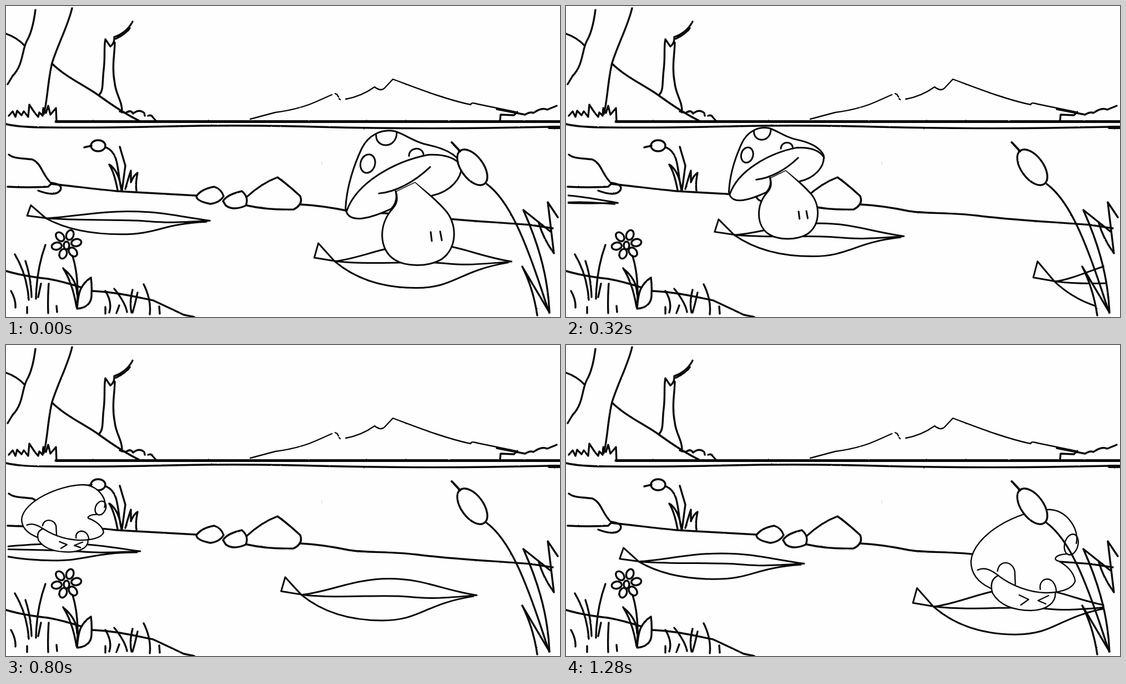
These frames come from a looping animation (998 px wide and 561 px high, 1.36 s). An HTML page:

```html
<!DOCTYPE html>
<html lang="en">
<head>
<meta charset="utf-8">
<title>Mushroom on the pond</title>
<style>
  html, body { margin: 0; width: 100%; height: 100%; overflow: hidden; background: #fefefe; }
  svg { display: block; width: 998px; height: 561px; }
  path, ellipse { vector-effect: non-scaling-stroke; }
  .solid { fill: #fefefe; }
  .bare { fill: #fefefe; stroke: none; }
  .pencil { filter: url(#pencil); stroke-width: 3.4; }
  .thin { stroke-width: 2.4; }
</style>
</head>
<body>
<svg viewBox="0 0 998 561" fill="none" stroke="#080808" stroke-width="3" stroke-linecap="round" stroke-linejoin="round">
  <defs>
    <filter id="pencil" filterUnits="userSpaceOnUse" x="0" y="0" width="998" height="561" color-interpolation-filters="sRGB">
      <feTurbulence type="fractalNoise" baseFrequency=".25" numOctaves="2" seed="4"/>
      <feDisplacementMap in="SourceGraphic" scale="1.6" xChannelSelector="R" yChannelSelector="G"/>
    </filter>
    <clipPath id="water"><path d="M3 0H950L968 457L980 561H3Z"/></clipPath>
  </defs>

  <g class="pencil">
    <!-- trees and far bank -->
    <path d="M53 7C50 30 45 50 38 62C28 80 32 105 12 126L3 141M0 50Q20 57 33 71M119 4C112 35 93 70 83 103C75 135 75 170 68 195"/>
    <path d="M83 104C110 130 140 142 168 162C190 178 215 195 240 207"/>
    <path d="M168 160C176 152 173 140 176 115C179 90 176 75 179 60L188 73Q196 67 195 56Q218 48 228 28M198 59Q216 50 223 40M196 66C196 85 190 110 196 140C198 160 210 172 209 192"/>
    <path d="M205 190L216 193Q224 186 229 194Q240 185 249 193L250 198M256 198Q262 196 264 200L270 207"/>
    <path d="M5 198L12 190L17 200L20 189L28 197L32 190L40 200L42 178L52 193L58 200L60 192L66 198L67 184L72 193L76 180L80 196L90 184L91 208"/>
    <path d="M90 208.5H998" stroke-width="5"/>
    <path d="M0 213Q25 219 75 219Q180 220 300 217Q420 214 560 218Q720 222 870 220L980 218"/>
    <path d="M979 219H998" stroke-width="6"/>
    <path class="thin" d="M440 204L485 192Q530 186 560 172L587 160M593 158l4 2M597 161l2 3M600 167l2 2M612 168Q640 163 664 146Q675 155 682 148L697 132C740 148 790 168 837 178Q838 173 850 177L918 191"/>
    <path d="M890 207L891 196L915 197L921 191M884 186L935 196Q945 190 950 193Q965 182 975 187L992 180"/>
    <!-- rocks and near bank -->
    <path d="M5 268C15 276 30 274 48 277C65 285 65 305 82 320L76 326Q40 328 3 326M82 319Q103 322 98 332Q90 345 58 333"/>
    <path d="M82 321C120 325 160 330 200 334L343 342M531 358Q570 360 618 370C650 375 690 372 740 378C800 386 870 389 945 395L985 401"/>
    <path d="M343 343Q352 330 375 326Q388 330 392 343Q385 355 368 357Q343 352 343 343ZM391 352Q398 340 425 334Q438 345 432 360Q410 370 396 360ZM433 345Q460 320 489 309Q505 320 530 343Q536 358 518 367Q470 368 435 360"/>
    <path d="M141 255L154 252M180 255C205 265 200 300 208 332M205 254L215 288Q212 310 209 332M186 286Q195 300 201 332M188 287Q204 300 208 332M215 330Q222 305 225 297L225 318Q230 305 237 301Q233 320 235 333"/>
    <ellipse cx="166" cy="252" rx="13" ry="10"/>
    <path d="M569 281v5" stroke="#ccc" stroke-width="1"/>
  </g>

  <path id="leaves" clip-path="url(#water)"/>

  <g id="sit">
    <path class="solid" d="M702 334C706 345 706 355 697 365C670 395 672 440 700 458C720 471 760 472 785 457C815 435 812 390 790 367C775 350 760 338 737 317Z"/>
    <path class="bare" d="M694 366C664 380 616 398 612 365C614 325 628 285 640 259C652 232 676 221 700 225C722 232 735 245 760 250C785 255 812 266 820 285C823 310 800 335 767 342L737 317L702 334Q707 352 694 366Z"/>
    <path d="M694 366C664 380 616 398 612 365C614 325 628 285 640 259C652 232 676 221 700 225C722 232 735 245 760 250C785 255 812 266 820 285C823 310 800 335 767 342M614 370C632 318 700 280 760 268C790 266 812 274 821 290M672 338C702 335 735 318 764 290M702 334Q707 352 694 366"/>
    <path d="M667 232C666 257 704 258 704 227M726 270C726 254 750 252 752 267M765 408L767 424M782 407L785 423"/>
    <ellipse cx="652" cy="284" rx="13" ry="17" transform="rotate(15 652 284)"/>
  </g>

  <g id="squash">
    <path class="bare" d="M262 347C230 357 215 356 217 346C228 312 255 260 285 238C303 230 312 240 315 257C350 268 375 285 371 306C365 320 355 329 342 335L350 352L354 372C354 395 335 408 300 408C270 408 250 395 250 375Q251 358 262 347Z"/>
    <path d="M262 347C230 357 215 356 217 346C228 312 255 260 285 238C303 230 312 240 315 257C350 268 375 285 371 306C365 320 355 329 342 335M217 346C240 318 290 308 330 308Q352 307 369 311M250 342C280 338 315 335 333 315"/>
    <path d="M265 340Q270 345 262 350C252 358 250 366 250 375C250 395 270 408 300 408C335 408 354 395 354 372C353 350 345 345 330 328"/>
    <path d="M284 246C286 268 311 264 311 248M323 306C323 294 342 294 344 306M314 374L323 383M330 379L332 382L339 373"/>
    <ellipse cx="266" cy="295" rx="11" ry="9"/>
  </g>

  <g id="splat" class="thin">
    <path class="bare" d="M762 441C742 432 726 418 726 392C730 345 810 300 868 299C900 301 922 335 916 360Q908 377 890 380C878 383 874 389 884 392C898 399 912 412 914 428C908 445 880 449 860 449L800 455Z"/>
    <path class="bare" d="M775 418C760 425 762 440 765 450C780 475 810 481 835 481C865 480 880 465 878 448L820 430Z"/>
    <path d="M762 441C742 432 726 418 726 392C730 345 810 300 868 299C900 301 922 335 916 360M900 379L890 380C878 383 874 389 884 392C898 399 912 412 914 428C908 445 880 449 860 449C830 448 800 436 778 420C762 407 750 402 738 408"/>
    <path d="M775 418C760 425 762 440 765 450C780 475 810 481 835 481C865 480 880 465 878 448"/>
    <path d="M774 410C776 390 800 390 805 410L806 434M851 443C847 420 878 415 880 447M813 453L830 461L816 471M866 454L847 463L861 469"/>
    <ellipse cx="907" cy="362" rx="12" ry="19" transform="rotate(15 907 362)"/>
  </g>

  <g id="jump" class="thin">
    <path class="solid" d="M498 92C470 110 440 117 425 103C395 75 398 30 415 0C435 -45 475 -75 520 -65C560 -55 600 -35 605 5Q608 35 590 54L540 10Z"/>
    <path class="bare" d="M490 40C505 50 508 70 498 92C490 110 495 130 515 145C535 160 570 160 590 144C610 125 610 100 605 85C600 65 580 45 540 10Z"/>
    <path d="M490 40C505 50 508 70 498 92C490 110 495 130 515 145C535 160 570 160 590 144C610 125 610 100 605 85C600 65 580 45 540 10M425 103C424 70 430 30 462 0C500 -35 580 -40 603 0M484 50C500 25 530 2 560 12"/>
    <path d="M446 9C430 4 414 15 417 30Q421 46 432 47M567 103v12M586 101v15"/>
  </g>

  <g class="pencil">
    <!-- cattail and reeds -->
    <ellipse class="solid" cx="840" cy="291" rx="20" ry="37" transform="rotate(-36 840 291)"/>
    <path d="M803 246L818 262" stroke-width="4"/>
    <path d="M866 321C905 350 935 415 978 553M932 368C955 420 976 480 979 553M932 368L981 407M994 381L976 354L987 446Q968 420 960 392"/>
    <path class="solid" d="M957 558Q950 510 930 470L979 553"/>
    <!-- near bank, flower and grass -->
    <path d="M0 478Q30 487 75 492C110 498 130 506 155 514C200 516 230 524 265 531Q295 545 320 557L339 561"/>
    <g id="flower" class="solid"></g>
    <path d="M120 451Q132 490 128 544M103 473Q120 500 127 543M106 476Q128 495 128 520"/>
    <path class="solid" d="M153 490C130 505 130 525 128 546C145 545 155 535 154 520Q155 505 153 490"/>
    <path d="M71 431Q55 475 54 528M16 448Q38 485 41 530M35 460Q45 490 46 525M63 501L58 525M77 501Q75 525 76 554M9 514Q18 530 17 544M38 543v11M91 541l1 11M179 514Q192 535 186 553M179 543v12M195 510Q215 535 218 552M204 540l-5 14M228 512Q222 535 226 553M237 517Q232 540 228 553M248 502Q262 530 259 556M276 542l1 13"/>
  </g>
</svg>

<script>
const STEP = 80, LOOP = 1360, POSES = 16;
const LAUNCH = 10, LANDING = 14;
const $ = id => document.getElementById(id);

const petal = i => `<ellipse cx="18" rx="9" ry="6.5" transform="translate(109 430) rotate(${i * 60 - 70})"/>`;
$('flower').innerHTML = [0, 1, 2, 3, 4, 5].map(petal).join('') + '<ellipse cx="109" cy="432" rx="5" ry="7"/>';

// Value at v on the broken line through the points, extended past both ends
function along(points, v) {
  let i = 1;
  while (i < points.length - 1 && points[i][0] < v) i++;
  const [x0, y0] = points[i - 1], [x1, y1] = points[i];
  return y0 + (y1 - y0) * (v - x0) / (x1 - x0);
}

// Where each leaf has drifted to by a given pose, the height of the
// stream at that place, and how far along its leaf the mushroom sits
const drift = [
  [[13, 802], [16, 592], [20, 303], [22, 187], [25, -48]],
  [[4, 880], [6, 710], [9, 532], [13, 249], [16, 72], [20, -190]]
];
const stream = [[-190, 347], [72, 383], [303, 413], [662, 472], [880, 497]];
const seat = [[-48, 150], [187, 113], [303, 98], [437, 128], [592, 151]];

// Leaves look longer and more open the nearer they are
function leafPath(x) {
  const y = along(stream, x);
  const length = 292 + .045 * x;
  const rise = Math.max(7, 10 + .036 * x);
  const drop = 56 * Math.sqrt(Math.max(0, x + 220) / 1100);
  const stem = 10 + .47 * drop;
  const tip = (50 - drop) * .2;
  const p = (u, v) => `${x + u * length} ${y + v} `;
  return `M${p(0, 0)}L${p(-.092, -stem)}L${p(-.115, -.2 * stem)}L${p(.01, 0)}` +
    `C${p(.2, .14 * drop)}${p(.4, tip / 2)}${p(.55, tip / 2 + 2)}S${p(.68, tip + .2 * drop)}${p(1, tip)}` +
    `M${p(0, 0)}C${p(.15, -.15 * rise)}${p(.3, -rise)}${p(.5, -rise)}S${p(.8, -.3 * rise)}${p(1, tip)}` +
    `M${p(0, 0)}C${p(.1, .56 * drop)}${p(.24, drop)}${p(.46, drop)}S${p(.7, .36 * drop)}${p(.98, tip + 2)}`;
}

// Bottom centre of each drawing, and its scale when the leaf is at x
const drawings = {
  sit: { origin: [743, 468], scale: x => [.63 + .00063 * x, .64 + .0006 * x] },
  squash: { origin: [300, 408], scale: () => [1, 1] },
  splat: { origin: [820, 481], scale: x => [.8 + .0003 * x, .69 + .00047 * x] },
  jump: { origin: [550, 157], scale: () => [1, 1] }
};

function poseName(k) {
  if (k < 6) return 'sit';
  if (k < 8) return 'squash';
  return k < LAUNCH || k >= LANDING ? 'splat' : 'jump';
}

function draw(now) {
  const step = Math.floor(now % LOOP / STEP);
  const k = step > 6 ? step - 1 : step; // the crouch is held for two steps

  $('leaves').setAttribute('d', drift.flatMap(points =>
    [k, k + POSES].map(i => leafPath(along(points, i)))).join(''));

  const name = poseName(k), { origin: [ox, oy], scale } = drawings[name];
  const leafX = along(drift[0], k < LANDING ? k + POSES : k);
  let x = leafX + along(seat, leafX), y = along(stream, leafX) + 7;
  if (name === 'jump') {
    const t = k - LAUNCH + 1;
    x = 102 + 112 * t;
    y = 382 - 202 * t + 36.4 * t * t;
  }
  for (const id in drawings) $(id).style.display = id === name ? '' : 'none';
  $(name).setAttribute('transform', `translate(${x} ${y}) scale(${scale(leafX)}) translate(${-ox} ${-oy})`);
}

const start = performance.now();
function tick() {
  draw(performance.now() - start);
  requestAnimationFrame(tick);
}
tick();
</script>
</body>
</html>
```
